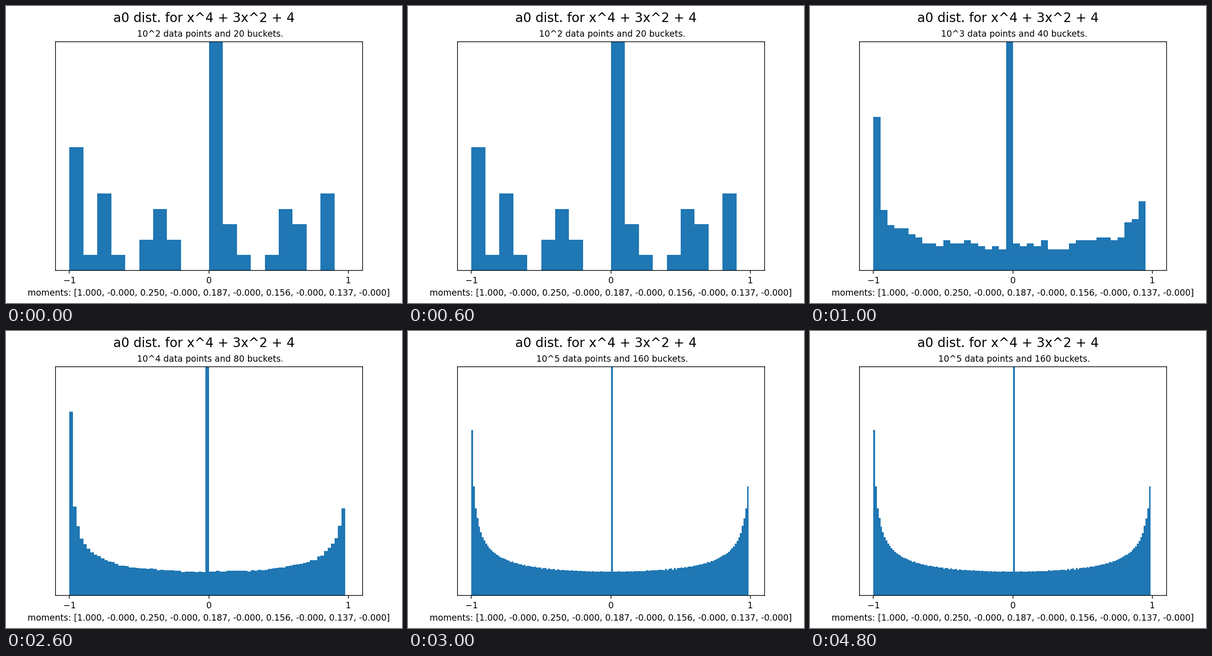
Recreate the animation shown at these times as a matplotlib script. Size 864x648 px, loop 6000 ms.

```python
import numpy as np
import matplotlib.pyplot as plt
from matplotlib.animation import FuncAnimation

ANGLE = np.arccos(1 / np.sqrt(8))  # argument of the root (1 + sqrt(-7)) / 2
GROWTH = 1.28e-7                   # slow drift of the normalised root's modulus
STAGES = 4
MOMENTS = ("[1.000, -0.000, 0.250, -0.000, 0.187, "
           "-0.000, 0.156, -0.000, 0.137, -0.000]")


def normalised_traces(count):
    """Mean of the r-th powers of the four normalised roots, r < count."""
    r = np.arange(count)
    return np.where(r % 2 == 0, np.exp(GROWTH * r) * np.cos(ANGLE * r), 0.0)


fig, ax = plt.subplots(figsize=(6.4, 4.8), dpi=135)
fig.suptitle("a0 dist. for x^4 + 3x^2 + 4", fontsize=15)


def draw(second):
    stage = min(second, STAGES - 1)
    exponent, buckets = stage + 2, 20 * 2 ** stage
    ax.clear()
    ax.hist(normalised_traces(10 ** exponent),
            bins=np.arange(-1, 1, 2 / buckets), density=True, color="#1f77b4")
    ax.set(xlim=(-1.1, 1.1), ylim=(0, 1.6), yticks=[])
    ax.set_xticks([-1, 0, 1], ["−1", "0", "1"])
    ax.set_xlabel("moments: " + MOMENTS)
    ax.set_title(f" 10^{exponent} data points and {buckets} buckets.", fontsize=10)
    return ax.patches


anim = FuncAnimation(fig, draw, frames=6, interval=1000, repeat=True)
plt.show()
```
